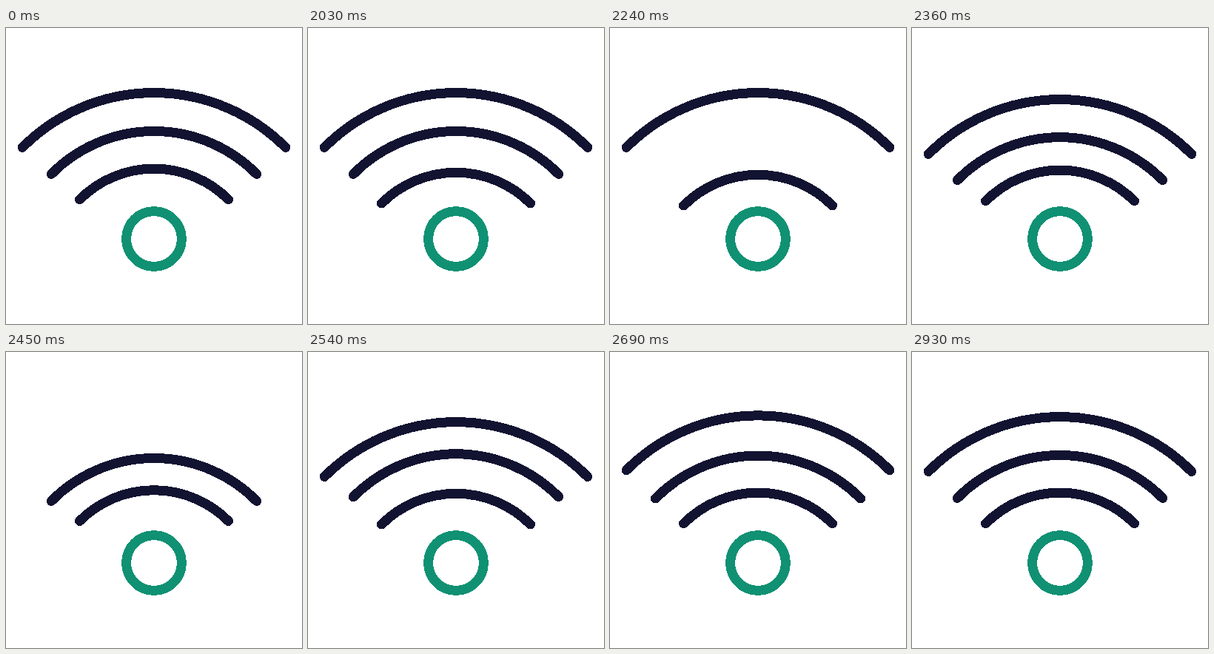
An HTML page that plays this animation: 400x400 px, repeating every 2.99 s.

```html
<!DOCTYPE html>
<html lang="en">
<head>
<meta charset="utf-8">
<title>Wireless signal</title>
<style>
  html, body { margin: 0; width: 100%; height: 100%; overflow: hidden; background: #fff; }
  svg { display: block; width: 100vw; height: 100vh; }
  path, circle { fill: none; stroke-width: 13; stroke-linecap: round; shape-rendering: crispEdges; }
  path { stroke: #121331; }
  circle { stroke: #109173; }
</style>
</head>
<body>
<svg viewBox="0 0 400 400">
  <path d="M99.5 231.8A142 142 0 0 1 300.5 231.8"/>
  <path d="M61.3 197.4A195 195 0 0 1 338.7 197.4"/>
  <path d="M22.2 161.4A251 251 0 0 1 377.8 161.4"/>
  <circle cx="200" cy="285" r="37.4"/>
</svg>
<script>
  const LOOP = 2990, START = 2030, STEP = 30;
  const DELAYS = [0, 4, 9]; // in steps, inner to outer
  // Vertical offset per step: dip, vanish (null), spring back.
  const BOUNCE = [
    5.2, 8.4, 9, null, null, null, 9, 8.2, 7.1, 5.7, 4, 2,
    0, -1.7, -3.4, -3, -0.6, 1.2, 0.6, 0.4, 0.2, 0.1
  ];
  const arcs = document.querySelectorAll('path');

  function offsetAt(step) {
    return step >= 0 && step < BOUNCE.length ? BOUNCE[step] : 0;
  }

  function draw(time) {
    const step = Math.floor((time % LOOP - START) / STEP);
    arcs.forEach((arc, i) => {
      const y = offsetAt(step - DELAYS[i]);
      arc.setAttribute('visibility', y === null ? 'hidden' : 'visible');
      arc.setAttribute('transform', `translate(0 ${y || 0})`);
    });
  }

  const origin = performance.now();
  function tick() {
    draw(performance.now() - origin);
    requestAnimationFrame(tick);
  }
  tick();
</script>
</body>
</html>
```
